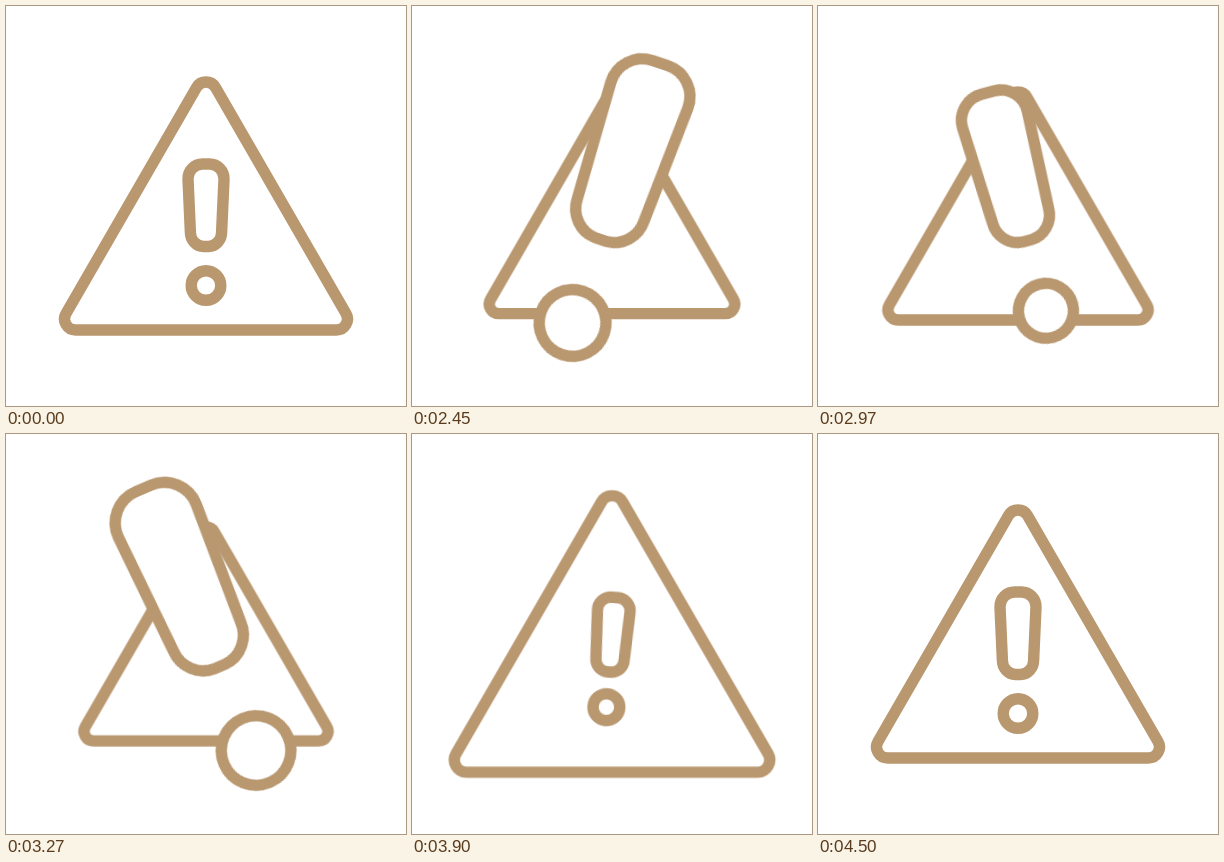
Animation, 400 px wide and 400 px high, one loop 4520 ms. Source, as an HTML page:

```html
<!DOCTYPE html>
<html lang="en">
<head>
<meta charset="utf-8">
<title>Warning sign</title>
<style>
  html, body { margin: 0; width: 100%; height: 100%; overflow: hidden; background: #fff; }
  svg { display: block; width: 100vw; height: 100vh; }
  path, circle {
    fill: #fff;
    stroke: #b99870;
    stroke-width: 11.4;
    vector-effect: non-scaling-stroke;
  }

  .sign, .tilt, .zoom {
    transform-origin: 0 0;
    animation: 4.52s cubic-bezier(.37, 0, .63, 1) infinite;
  }
  .sign { animation-name: sign; }
  .tilt { animation-name: tilt; }
  .zoom { animation-name: zoom; }

  /* The sign shrinks while the mark grows, twice, then springs back */
  @keyframes sign {
    0%, 43.8%  { transform: scale(1); }
    52%        { transform: scale(.855); }
    61.5%      { transform: scale(.955); }
    71.46%     { transform: scale(.862); animation-timing-function: cubic-bezier(.93, 0, .27, 1); }
    86.95%     { transform: scale(1.115); }
    94.25%     { transform: scale(.985); }
    99.56%, to { transform: scale(1); }
  }
  @keyframes tilt {
    0%, 43.8%  { transform: rotate(0deg); }
    52%        { transform: rotate(20deg); }
    71.46%     { transform: rotate(-23.5deg); }
    86.95%     { transform: rotate(4.5deg); }
    94.25%     { transform: rotate(-1.5deg); }
    99.56%, to { transform: rotate(0deg); }
  }
  @keyframes zoom {
    0%, 43.8%     { transform: translateY(26px) scale(1); }
    52%, 71.46%   { transform: translateY(1px) scale(2.36); }
    61.5%         { transform: translateY(14px) scale(1.55); }
    86.95%        { transform: translateY(25px) scale(.9); }
    94.25%        { transform: translateY(26px) scale(1.01); }
    99.56%, to    { transform: translateY(26px) scale(1); }
  }
</style>
</head>
<body>
<svg viewBox="0 0 400 400">
  <g transform="translate(200 200)">
    <g class="sign">
      <path d="M-9.53-118.5A11 11 0 0 1 9.53-118.5L139.98 107.5A11 11 0 0 1 130.45 124H-130.45A11 11 0 0 1-139.98 107.5Z"/>
    </g>
    <g class="tilt">
      <g class="zoom">
        <path d="M-3.5-68H3.5A14.5 14.5 0 0 1 18-53L15.6.5A13.5 14 0 0 1 2.5 14.5H-2.5A13.5 14 0 0 1-15.6.5L-18-53A14.5 14.5 0 0 1-3.5-68Z"/>
        <circle cy="53.5" r="14.8"/>
      </g>
    </g>
  </g>
</svg>
</body>
</html>
```
